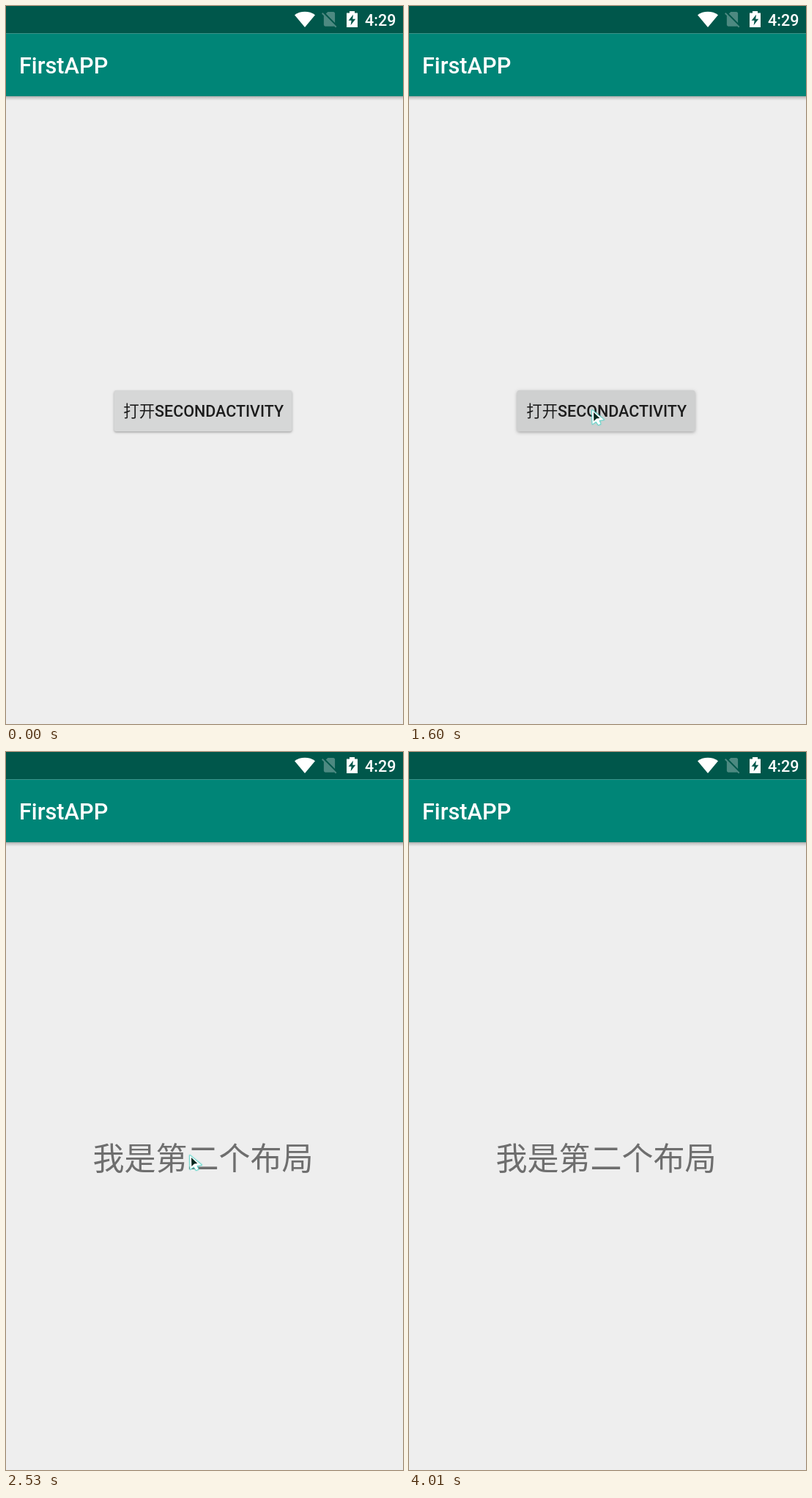
Animation, 542 px wide and 979 px high, one loop 4.79 s. Source, as an HTML page with a canvas:

```html
<!DOCTYPE html>
<html lang="zh">
<head>
<meta charset="utf-8">
<title>FirstAPP</title>
<style>
html, body { margin: 0; width: 100%; height: 100%; overflow: hidden; background: #eee; }
canvas { display: block; }
</style>
</head>
<body>
<canvas id="stage" width="542" height="979"></canvas>
<script>
const W = 542, H = 979, LOOP = 4790;
const ctx = document.getElementById('stage').getContext('2d');
const LATIN = 'Roboto, sans-serif';
const CJK = '"Noto Sans CJK SC", "Noto Sans CJK", sans-serif';

// Pointer track: time, x, y. Each position holds until the next.
const track = [
  [280, 358, 940], [360, 315, 830], [440, 278, 725], [520, 256, 645],
  [600, 248, 594], [670, 246, 564], [750, 247, 550], [830, 247, 548],
  [2530, 248, 547], [3310, 252, 548], [3380, 266, 560], [3460, 300, 595],
  [3540, 345, 650], [3620, 395, 715], [3700, 436, 772], [3780, 471, 822],
  [3860, 484, 870], [3930, 493, 914]
];
const POINTER_END = 4010;
const clickTimes = [1290, 1360, 1440, 1520, 1600, 1670, 1750];

const wifi = new Path2D('M408 29L394 12.2Q400 7.8 408 7.8T422 12.2Z');
const noSim = new Path2D('M18.99 5c0-1.1-.89-2-1.99-2h-7L7.66 5.34 19 16.68zM3.65 3.88L2.38 5.15 5 7.77V19c0 1.1.9 2 2 2h10c.35 0 .67-.1.96-.26l1.88 1.88 1.27-1.27z');
const battery = new Path2D('M465 9.6H469V7H476V9.6H480V29H465Z');
const bolt = new Path2D('M474 11.8L467.6 19.8H471.6L470.6 26.2L477.2 17.8H473.2Z');
const arrow = new Path2D('M3 3L19 16L12.5 17L14.5 22L11.5 23L8.5 18.5L3.5 22Z');
const arrowCore = new Path2D('M5 6L13.3 14L9 14.6L5.4 18Z');

function text(str, x, y, size, weight, family, color) {
  ctx.font = `${weight} ${size}px ${family}`;
  ctx.fillStyle = color;
  ctx.fillText(str, x, y);
}

function fill(path, color) {
  ctx.fillStyle = color;
  ctx.fill(path);
}

function rect(x, y, w, h, color) {
  ctx.fillStyle = color;
  ctx.fillRect(x, y, w, h);
}

function disc(x, y, r, color) {
  ctx.beginPath();
  ctx.arc(x, y, r, 0, Math.PI * 2);
  ctx.fillStyle = color;
  ctx.fill();
}

function drawWindow() {
  rect(0, 0, W, H, '#eeeeee');
  const shade = ctx.createLinearGradient(0, 123, 0, 129);
  shade.addColorStop(0, 'rgba(0,0,0,.27)');
  shade.addColorStop(.45, 'rgba(0,0,0,.12)');
  shade.addColorStop(1, 'rgba(0,0,0,0)');
  rect(0, 123, W, 6, shade);
  rect(0, 0, W, 37.5, '#00574b');
  rect(0, 37.5, W, 85.5, '#008577');
  text('FirstAPP', 18, 92, 30.7, 500, LATIN, '#fff');
}

function drawStatus() {
  fill(wifi, '#fff');
  ctx.save();
  ctx.translate(428.4, 4.8);
  ctx.scale(1.09, 1.09);
  fill(noSim, 'rgba(255,255,255,.3)');
  ctx.restore();
  fill(battery, '#fff');
  fill(bolt, '#00574b');
  text('4:29', 490, 27, 21.5, 500, LATIN, '#fff');
}

function drawButton(t) {
  const pressed = t >= 1360;
  const box = new Path2D();
  box.roundRect(147.5, 524, 243, 56, 3);
  ctx.save();
  ctx.shadowColor = 'rgba(0,0,0,.3)';
  ctx.shadowBlur = pressed ? 4 : 3;
  ctx.shadowOffsetY = 1.5;
  fill(box, '#d6d7d7');
  ctx.restore();
  if (pressed) {
    const p = Math.min(1, (t - 1290) / 310);
    ctx.save();
    ctx.clip(box);
    rect(147, 524, 244, 56, 'rgba(0,0,0,.03)');
    disc(249 + 20 * p, 552, 150 * p, `rgba(0,0,0,${.05 * (1 - p)})`);
    ctx.restore();
  }
  const ink = '#1c1c1c';
  text('打开', 160.3, 560, 21.5, 400, CJK, ink);
  text('SECONDACTIVITY', 203, 560, 21.5, 500, LATIN, ink);
}

function drawFirst(t) {
  drawWindow();
  drawButton(t);
}

function drawSecond() {
  drawWindow();
  text('我是第二个布局', 118.5, 569.5, 43, 400, CJK, '#6e6e6e');
}

// The second screen rises and fades in over the first.
function drawOpening(t) {
  const age = t - 1570;
  drawFirst(t);
  rect(0, 0, W, H, 'rgba(0,0,0,.12)');
  ctx.save();
  ctx.globalAlpha = 1 - (1 - Math.min(1, age / 200)) ** 4;
  ctx.translate(0, Math.round(78 * (1 - age / 350) ** 5));
  drawSecond();
  ctx.restore();
}

function drawPointer(t) {
  if (t >= POINTER_END) return;
  const spot = track.findLast(p => p[0] <= t);
  if (!spot) return;
  const resting = spot[0] === 750 || spot[0] === 830 || spot[0] === 2530;
  const glow = resting ? '#55d5c8' : '#35e4e4';
  ctx.save();
  ctx.translate(spot[1], spot[2]);
  ctx.lineJoin = 'round';
  ctx.shadowColor = glow;
  ctx.shadowBlur = resting ? 2 : 3;
  ctx.strokeStyle = glow;
  ctx.lineWidth = resting ? 1.4 : 2.2;
  ctx.stroke(arrow);
  ctx.shadowBlur = 0;
  fill(arrow, '#fff');
  fill(arrowCore, resting ? '#06291f' : '#343c40');
  ctx.restore();
}

function draw(t) {
  const step = clickTimes.findLast(s => s <= t) || 0;
  if (step === 1750) drawSecond();
  else if (step === 1670) drawOpening(step);
  else drawFirst(step);
  drawStatus();
  drawPointer(t);
  if (step === 1290 || step === 1360) disc(249, 550.5, 16, 'rgba(245,245,0,.57)');
}

let start;
function tick(now) {
  start ??= now;
  draw((now - start) % LOOP);
  requestAnimationFrame(tick);
}
draw(0);
requestAnimationFrame(tick);
</script>
</body>
</html>
```
